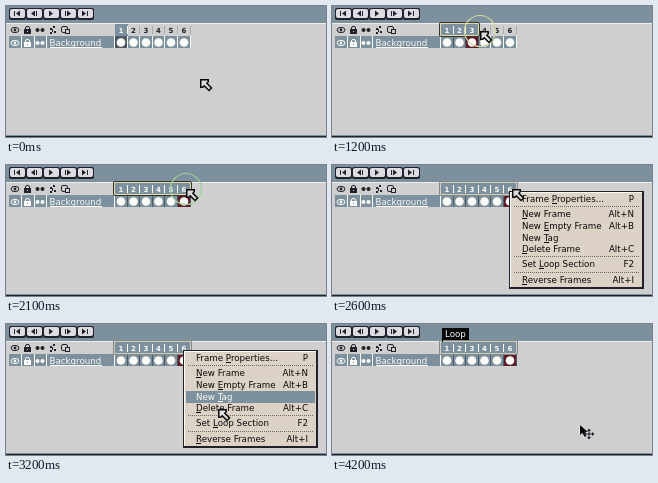
An HTML page with a canvas that plays this animation: 320 px wide and 131 px high, repeating every 4400 ms.

```html
<!DOCTYPE html>
<html lang="en">
<head>
<meta charset="utf-8">
<title>Timeline loop section</title>
<style>
html, body { margin: 0; width: 100%; height: 100%; overflow: hidden; background: #cfcfcf; }
canvas { display: block; }
</style>
</head>
<body>
<canvas id="stage" width="320" height="131"></canvas>
<script>
const ctx = document.getElementById('stage').getContext('2d');
const LOOP = 4400, STEP = 100, HOVER_LAG = 70;
const GRAY = '#cfcfcf', BLUE = '#7c919d', SLATE = '#4d5a64', DARK = '#20212a';
const WHITE = '#fbfbf8', RED = '#611b29', BEIGE = '#dcd2c5', BLACK = '#08080a';
const FONT = '"DejaVu Sans", sans-serif';

// time, x, y: the pointer eases between these stops
const PATH = [
  [0, 194, 73], [600, 115, 25], [700, 115, 25], [1700, 180, 24], [2600, 180, 24],
  [2800, 180, 24], [3400, 222, 105], [3600, 222, 105], [4000, 248, 101], [LOOP, 248, 101]
];
// label, shortcut, center y, index of the underlined letter
const MENU = [
  ['Frame Properties...', 'P', 34, 6], ['New Frame', 'Alt+N', 49, 0],
  ['New Empty Frame', 'Alt+B', 61, 4], ['New Tag', '', 73, 4],
  ['Delete Frame', 'Alt+C', 84, 0], ['Set Loop Section', 'F2', 99, 4],
  ['Reverse Frames', 'Alt+I', 115, 0]
];

function rect(x, y, w, h, color) {
  ctx.fillStyle = color;
  ctx.fillRect(x, y, w, h);
}

function roundBox(x, y, w, h, color) {
  ctx.beginPath();
  ctx.roundRect(x, y, w, h, 2);
  ctx.fillStyle = color;
  ctx.fill();
}

function frame(x, y, w, h, color) {
  ctx.strokeStyle = color;
  ctx.lineWidth = 1;
  ctx.beginPath();
  ctx.roundRect(x + .5, y + .5, w - 1, h - 1, 1.5);
  ctx.stroke();
}

function poly(points, fill, stroke, width = 1) {
  ctx.beginPath();
  points.forEach(([x, y]) => ctx.lineTo(x, y));
  ctx.closePath();
  if (stroke) { ctx.strokeStyle = stroke; ctx.lineWidth = width; ctx.stroke(); }
  ctx.fillStyle = fill;
  ctx.fill();
}

function circle(x, y, r, fill, stroke) {
  ctx.beginPath();
  ctx.arc(x, y, r, 0, Math.PI * 2);
  if (fill) { ctx.fillStyle = fill; ctx.fill(); }
  if (stroke) { ctx.strokeStyle = stroke; ctx.lineWidth = 1.2; ctx.stroke(); }
}

function text(label, x, y, color, { size = 8.7, weight = 'normal', align = 'left' } = {}) {
  ctx.font = `${weight} ${size}px ${FONT}`;
  ctx.textAlign = align;
  ctx.fillStyle = color;
  ctx.fillText(label, x, y);
}

function at(x, y, draw) {
  ctx.save();
  ctx.translate(x, y);
  draw();
  ctx.restore();
}

function pointer(t) {
  const i = Math.max(1, PATH.findIndex(p => p[0] > t));
  const [t0, x0, y0] = PATH[i - 1], [t1, x1, y1] = PATH[i];
  const k = (t - t0) / (t1 - t0), e = (1 - Math.cos(Math.PI * k)) / 2;
  return [Math.round(x0 + (x1 - x0) * e), Math.round(y0 + (y1 - y0) * e)];
}

function drawButtons() {
  const triangle = (x, dir) => poly([[x - 2 * dir, -3], [x + 2 * dir, 0], [x - 2 * dir, 3]], DARK);
  const bar = x => rect(x, -2.5, 1, 5, DARK);
  const glyphs = [
    () => { bar(-3); triangle(1, -1); },
    () => { triangle(-1, -1); bar(2); },
    () => triangle(0, 1),
    () => { bar(-3); triangle(1, 1); },
    () => { triangle(-1, 1); bar(2); }
  ];
  glyphs.forEach((glyph, i) => {
    const x = 3 + 17 * i;
    roundBox(x, 2, 17, 12, DARK);
    roundBox(x + 1, 3, 15, 9, '#dcdce2');
    at(x + 8, 7.5, glyph);
  });
}

function drawEye(x, y, color) {
  ctx.beginPath();
  ctx.ellipse(x, y, 4, 2.6, 0, 0, Math.PI * 2);
  ctx.strokeStyle = color;
  ctx.lineWidth = 1;
  ctx.stroke();
  circle(x, y, 1.4, color);
}

function drawLock(x, y, color, hole) {
  rect(x - 3, y - 1, 7, 5, color);
  rect(x, y, 1, 2, hole);
  frame(x - 2, y - 4, 5, 5, color);
}

function drawLink(x, y, color) {
  circle(x - 2.5, y, 2, color);
  circle(x + 2.5, y, 2, color);
}

function drawLayer() {
  rect(3, 30, 106, 12, BLUE);
  [15, 28, 40, 108].forEach(x => rect(x, 30, 1, 12, WHITE));
  [[DARK, GRAY, 24], [WHITE, BLUE, 37]].forEach(([color, back, y]) => {
    drawEye(9, y, color);
    drawLock(21, y, color, back);
    drawLink(34, y, color);
  });
  [[44, 22], [47, 20], [44, 26], [48, 25]].forEach(([x, y]) => rect(x, y, 2, 2, DARK));
  rect(46, 23, 1, 3, DARK);
  frame(55, 20, 7, 7, DARK);
  rect(59, 23, 5, 5, DARK);
  rect(60, 24, 3, 3, GRAY);
  text('Background', 43.5, 40, WHITE);
  rect(44, 41, 52, 1, WHITE);
}

const cellX = i => Math.round(109 + 12.6 * i);

function drawCells(t, count) {
  const active = count - 1;
  for (let i = 0; i < 6; i++) {
    const x = cellX(i), w = cellX(i + 1) - x, selected = i < count;
    const header = !selected ? GRAY : t >= 600 && t < 800 ? '#9db1bc' : BLUE;
    rect(x, 18, w, 12, header);
    rect(x + w - 1, 20, 1, 8, selected ? WHITE : '#a9adae');
    text(i + 1, x + w / 2 - .5, 27, selected ? WHITE : DARK, { size: 7, weight: 'bold', align: 'center' });
    rect(x, 30, w, 12, i !== active ? BLUE : t < 800 ? SLATE : RED);
    rect(x + w - 1, 30, 1, 12, selected && t >= 800 ? SLATE : WHITE);
    circle(x + w / 2 - .5, 36.5, 4.3, WHITE);
  }
}

function drawRange(count, hot) {
  const w = cellX(count) - 106;
  frame(107, 16, w, 15, hot ? '#35352d' : '#858981');
  frame(108, 17, w - 2, 13, hot ? '#e2dea9' : '#cacdbd');
}

function drawMenu(t) {
  const hoverY = pointer(t - HOVER_LAG)[1];
  rect(177, 26, 135, 98, DARK);
  rect(178, 27, 132, 95, WHITE);
  rect(179, 28, 131, 94, BEIGE);
  for (const y of [41, 91, 107])
    for (let x = 182; x < 308; x += 2) rect(x, y, 1, 1, '#6f6a66');
  MENU.forEach(([label, key, y, mark]) => {
    const hover = t >= 2900 && Math.abs(hoverY - y) < 6;
    const color = hover ? WHITE : BLACK;
    if (hover) rect(180, y - 6, 129, 12, BLUE);
    text(label, 190, y + 3, color);
    const before = ctx.measureText(label.slice(0, mark)).width;
    rect(Math.round(190 + before), y + 4, 5, 1, color);
    text(key, 302, y + 3, color, { align: 'right' });
  });
}

function drawTag() {
  rect(110, 4, 27, 12, BLACK);
  rect(110, 15, 1, 3, BLACK);
  text('Loop', 113, 13, WHITE);
}

function drawArrow() {
  poly([[1.5, 1.5], [7.5, 1.5], [7.5, 2.5], [5.8, 4.2], [10.5, 9], [9, 10.5], [4.2, 5.8], [2.5, 7.5], [1.5, 7.5]],
    '#dedede', BLACK, 3);
}

function drawMoveArrow() {
  poly([[0, 0], [0, 10], [2.5, 8], [4.5, 12], [6.5, 11], [4.8, 7.2], [8, 7]], BLACK, WHITE, 1);
  at(9, 9, () => {
    rect(-4, -.5, 8, 1, DARK);
    rect(-.5, -4, 1, 8, DARK);
    for (let i = 0; i < 4; i++) {
      poly([[-2, -3], [0, -5.5], [2, -3]], DARK);
      ctx.rotate(Math.PI / 2);
    }
  });
}

function render(t) {
  const [x, y] = pointer(t);
  const between = (a, b) => t >= a && t < b;
  const reach = Math.floor((pointer(t - HOVER_LAG)[0] - 109) / 12.6) + 1;
  const selected = t < 800 ? 1 : t < 1700 ? Math.min(6, reach) : 6;

  rect(0, 0, 320, 131, GRAY);
  rect(0, 0, 320, 17, BLUE);
  rect(0, 17, 320, 1, '#eeeeec');
  rect(0, 129, 320, 1, BLUE);
  rect(0, 130, 320, 1, DARK);
  drawButtons();
  drawLayer();
  drawCells(t, selected);
  if (t >= 600) drawRange(selected, between(800, 2600));
  if (t >= 3700) drawTag();
  if (between(2200, 3700)) drawMenu(t);
  if (between(800, 2000) || between(3500, 3700)) circle(x, y, 15.5, null, '#d5d5a5');
  if (between(2100, 2400)) circle(x, y, 15.5, null, '#9fcf9b');
  at(x, y, t >= 3800 ? drawMoveArrow : drawArrow);
}

function tick() {
  const t = performance.now() % LOOP;
  render(Math.floor(t / STEP) * STEP);
  requestAnimationFrame(tick);
}
tick();
</script>
</body>
</html>
```
